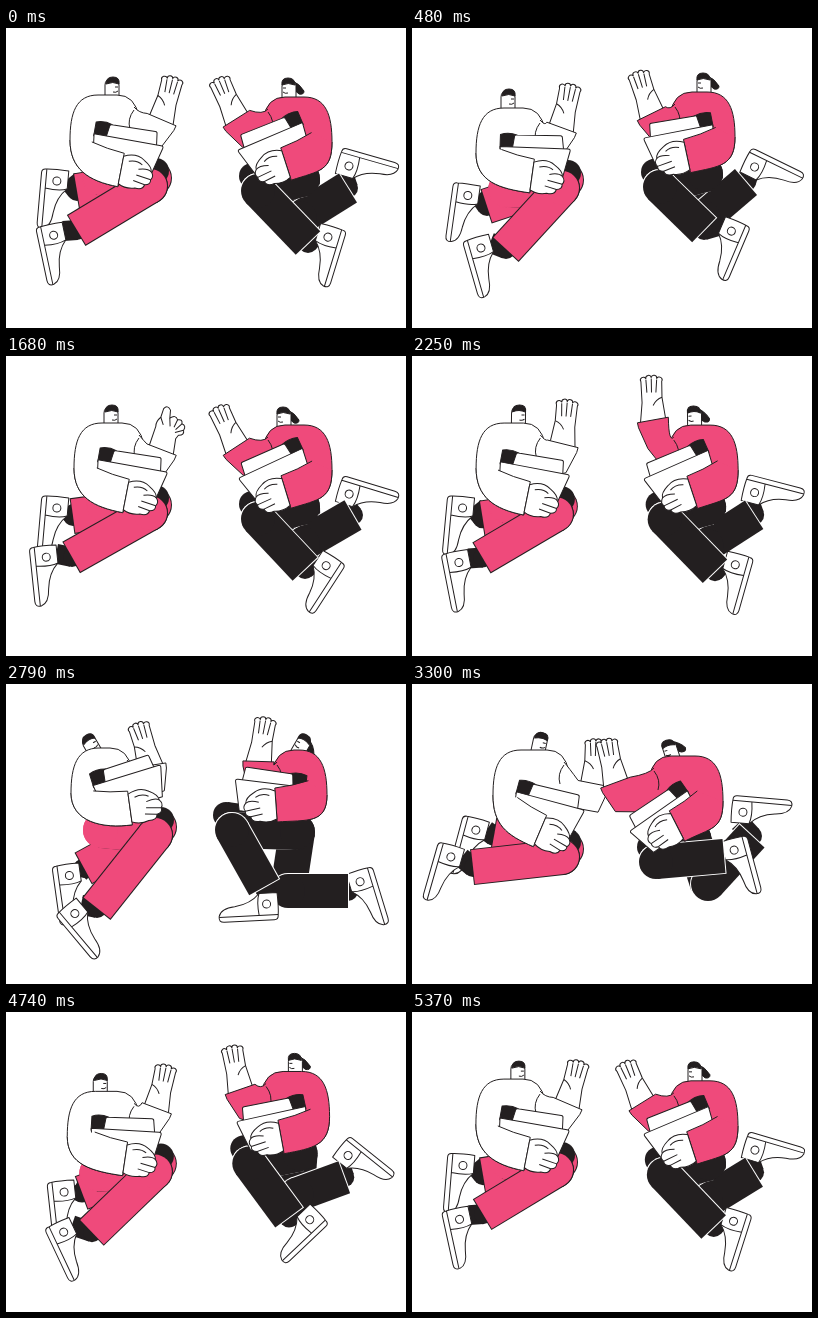
An HTML page with a canvas that plays this animation: 400x300 px, repeating every 5.4 s.

```html
<!DOCTYPE html>
<html>
<head>
<meta charset="utf-8">
<style>
html, body { margin: 0; width: 100%; height: 100%; overflow: hidden; background: #fff; }
canvas { display: block; }
</style>
</head>
<body>
<canvas id="stage" width="400" height="300"></canvas>
<script>
const ctx = document.getElementById('stage').getContext('2d');
const INK = '#231f20', PINK = '#ef4a7b', WHITE = '#fff';
const LOOP = 5400, STEP = 30;

// Pose schedule: times in ms and the pose reached at each.
// 0 glide, 1 falling, 2 low, 3 rising, 4 crouch, 5 high five, 6 reach
const times = [0, 480, 990, 1680, 2280, 2790, 3300, 3500, 4080, 4570];
const order = [0, 1, 2, 3, 6, 4, 5, 5, 1, 2];

// Tracks hold [x, y, angle] per pose; body holds [left, top, right].
// The right figure is described mirrored, so both share one drawing routine.
const left = { shirt: WHITE, pants: PINK, edge: INK };
left.head = [[106, 68, 0], [96, 80, 0], [92, 83, 0], [105, 68, 0], [89, 68, -30], [126, 67, 12]];
left.body = [[64, 67, 133], [64, 80, 133], [61, 82, 133], [68, 67, 138], [65, 64, 126], [81, 66, 157]];
left.cuff = [[115, 142, 11], [120, 148, 8], [120, 148, 8], [120, 140, 11], [124, 124, -8], [128, 147, 23]];
left.palm = [[155, 92, 14], [149, 100, 11], [149, 98, 11], [155, 94, 12], [144, 82, -18], [181, 100, 2], [150, 88, 4]];
left.book = [[157, 118, 10], [158, 121, 2], [155, 121, 2], [161, 116, 10], [154, 81, -17], [172, 126, 15]];
left.knee = [[144, 158], [150, 160], [150, 160], [144, 157], [149, 151], [150, 173]];
left.hem = [[71, 202], [94, 221], [90, 224], [66, 201], [91, 224], [61, 183]];
left.foot = [[58, 203, 78], [79, 215, 74], [70, 216, 63], [51, 198, 84], [76, 221, 50], [50, 174, 106]];
left.rearHem = [[71, 163], [75, 178], [77, 184], [67, 160], [78, 184], [82, 152]];
left.rearFoot = [[62, 152, 95], [67, 167, 98], [70, 181, 83], [62, 151, 95], [74, 188, 82], [75, 147, 105]];

const right = { shirt: PINK, pants: INK, edge: WHITE, tail: true };
right.head = [[117, 69, 0], [108, 64, 0], [109, 59, 0], [122, 70, 0], [108, 68, -30], [139, 74, 18]];
right.body = [[74, 69, 143], [77, 64, 142], [77, 58, 145], [74, 69, 143], [79, 66, 134], [89, 72, 163]];
right.cuff = [[120, 136, 18], [125, 128, 12], [126, 123, 9], [120, 136, 17], [130, 121, 4], [135, 142, 27]];
right.palm = [[169, 91, 23], [160, 86, 17], [164, 76, 8], [169, 91, 24], [147, 78, -11], [196, 99, 11], [158, 64, 0]];
right.book = [[168, 122, 23], [168, 110, 11], [169, 107, 10], [167, 122, 25], [170, 95, -7], [182, 147, 35]];
right.knee = [[148, 163], [152, 159], [158, 150], [148, 163], [174, 146], [156, 178]];
right.hem = [[98, 215], [108, 202], [120, 203], [101, 213], [142, 203], [88, 172]];
right.foot = [[88, 204, 73], [90, 197, 67], [104, 197, 40], [88, 202, 57], [138, 209, 3], [89, 167, 105]];
right.rearKnee = [[106, 190], [108, 190], [110, 182], [103, 188], [118, 207], [104, 200]];
right.rearHem = [[58, 160], [66, 154], [63, 165], [53, 159], [58, 207], [60, 152]];
right.rearFoot = [[62, 148, 164], [64, 148, 154], [67, 151, 138], [62, 148, 163], [57, 199, 107], [72, 139, 175]];

const art = Object.fromEntries(Object.entries({
  shoe: 'M-9 0Q-10 14-9 23Q-9 27-5 27H45Q51 27 50 21Q48 13 34 12Q18 10 9 0Z',
  shoeLines: 'M-9 22H50M9 0Q12 8 10 22M6 11a4 4 0 1 0-8 0a4 4 0 1 0 8 0',
  open: 'M-13 3L-9-23L-9-39a2.7 2.7 0 0 1 5-3a2.7 2.7 0 0 1 5.4-1a2.7 2.7 0 0 1 5.4 1a2.7 2.7 0 0 1 5 3L11-18L13 3',
  openLines: 'M-4-41L-3-28M1.4-42V-28M6.8-41L6-28M-9-23q6 2 9 8',
  thumb: 'M-13 3L-10-22Q-11-27-7-32L-6-41Q-3-46 1-41L2-33Q7-38 10-33Q15-35 15-30Q20-29 18-24Q20-19 14-18L12-14L13 3',
  thumbLines: 'M2-33L4-25M10-33L8-25M15-30L10-23M18-24L10-20M-7-32L-3-25',
  ring: 'M-13 3L-11-23L-11-40a2.7 2.7 0 0 1 5.4-2a2.7 2.7 0 0 1 5.4-3a2.7 2.7 0 0 1 5.4 1Q10-50 15-47Q23-44 21-35Q20-27 13-24L13 3',
  ringLines: 'M-5.6-42L-4-28M0-45V-28M5-44L4-30M18-38a5 5 0 1 0-10 0a5 5 0 1 0 10 0M7-31Q12-26 18-29',
  grip: 'M0-14Q12-20 21-14Q30-9 30-4Q34 0 31 4Q32 9 26 10Q25 16 17 15Q8 18 0 14Z',
  gripLines: 'M17-4Q26-7 30-4M16 2L31 4M14 8L26 10M6-10Q14-13 20-9',
  neck: 'M-7 3V-11Q-7-17 0-17Q7-17 7-11V3',
  face: 'M3-9h3M1-4q3 1 5-1',
  hair: 'M-6-12Q-6-19 1-19Q8-19 7-12Q1-15-6-12Z',
  tail: 'M-3-16Q-10-14-15-6Q-15-2-10-3Q-5-6-3-12Z',
  blackBook: 'M-70-12Q-62-15-53-12L-52 2H-70Z',
  rearBook: 'M-56-10Q-56-12-54-12L-10-13Q-8-13-8-11L-6 4H-58Z',
  frontBook: 'M-70 0H-2Q1 0 0 3L-7 31H-66Z'
}).map(([name, d]) => [name, new Path2D(d)]));

function sampler(time) {
  const n = times.length;
  let i = n - 1;
  while (times[i] > time) i--;
  const when = k => times[(k + n) % n] + Math.floor(k / n) * LOOP;
  const [t0, t1, t2, t3] = [-1, 0, 1, 2].map(k => when(i + k));
  const span = t2 - t1, u = (time - t1) / span;
  return track => {
    const [a, b, c, d] = [-1, 0, 1, 2].map(k => track[order[(i + k + n) % n]] || track[0]);
    return b.map((p, k) => {
      const q = c[k];
      const m = (q - a[k]) / (t2 - t0) * span, w = (d[k] - p) / (t3 - t1) * span;
      return p + u * (m + u * (3 * (q - p) - 2 * m - w + u * (2 * (p - q) + m + w)));
    });
  };
}

function paint(path, fill, line = INK) {
  if (fill) { ctx.fillStyle = fill; ctx.fill(path); }
  if (line) { ctx.strokeStyle = line; ctx.stroke(path); }
}

function place([x, y, angle = 0], draw) {
  ctx.save();
  ctx.translate(x, y);
  ctx.rotate(angle * Math.PI / 180);
  draw();
  ctx.restore();
}

// Point of a rotated part in figure coordinates
function spot([x, y, angle], px, py) {
  const r = angle * Math.PI / 180, c = Math.cos(r), s = Math.sin(r);
  return [x + px * c - py * s, y + px * s + py * c];
}

function limb([ax, ay], [bx, by], width, fill, edge) {
  const len = Math.hypot(bx - ax, by - ay) || 1;
  const ux = (bx - ax) / len, uy = (by - ay) / len;
  for (const [grow, color] of [[1, edge], [0, fill]]) {
    ctx.strokeStyle = ctx.fillStyle = color;
    ctx.lineWidth = width + grow * 2;
    ctx.beginPath();
    ctx.moveTo(ax, ay);
    ctx.lineTo(bx + ux * grow, by + uy * grow);
    ctx.stroke();
    ctx.beginPath();
    ctx.arc(ax, ay, width / 2 + grow, 0, 7);
    ctx.fill();
  }
  ctx.lineWidth = 1;
}

function foot(hem, ankle) {
  limb(hem, ankle, 18, INK, INK);
  place(ankle, () => { paint(art.shoe, WHITE); paint(art.shoeLines); });
}

function person(who, get, gesture) {
  const [x, top, edgeX] = get(who.body);
  const cuff = get(who.cuff), palm = get(who.palm), knee = get(who.knee);
  const hem = get(who.hem), rearHem = get(who.rearHem);
  const rearKnee = who.rearKnee ? get(who.rearKnee) : [knee[0] + 4, knee[1] - 8];
  const hip = [x + 30, top + 82];
  const leg = (a, b) => limb(a, b, 34, who.pants, who.edge);

  foot(rearHem, get(who.rearFoot));
  limb(hip, rearKnee, 34, who.pants, who.pants);
  leg(rearKnee, rearHem);
  foot(hem, get(who.foot));
  limb([knee[0] + 6, knee[1] - 15], [x + 50, top + 72], 24, INK, INK);
  limb(knee, hip, 34, who.pants, who.edge);
  limb(hip, knee, 34, who.pants, who.pants);
  leg(knee, hem);

  place(get(who.head), () => {
    if (who.tail) paint(art.tail, INK);
    paint(art.neck, WHITE);
    paint(art.face);
    paint(art.hair, INK);
  });

  const cuffTop = spot(cuff, 0, -17), cuffEnd = spot(cuff, 0, 17);
  const bend = spot(cuff, -30, 17);
  const elbow = `C${x} ${top + 74} ${bend} ${cuffEnd}`;
  paint(new Path2D(`M${cuffEnd}L${edgeX - 4} ${top + 58}L${edgeX} ${top + 22}Q${edgeX - 4} ${top} ${edgeX - 22} ${top}
    H${x + 28}C${x + 6} ${top} ${x} ${top + 18} ${x} ${top + 45}${elbow}`), who.shirt);

  place(palm, () => { paint(art[gesture], WHITE); paint(art[gesture + 'Lines']); });
  paint(new Path2D(`M${edgeX - 5} ${top + 12}Q${edgeX} ${top + 18} ${spot(palm, -15, -3)}L${spot(palm, 16, 2)}
    L${spot(palm, 15, 7)}L${spot(palm, 6, 28)}L${edgeX - 5} ${top + 56}`), who.shirt);
  paint(new Path2D(`M${edgeX - 5} ${top + 15}Q${edgeX - 12} ${top + 24} ${edgeX - 9} ${top + 34}`));

  place(get(who.book), () => {
    paint(art.blackBook, INK);
    paint(art.rearBook, WHITE);
    paint(art.frontBook, WHITE);
  });

  const crease = spot(cuff, -34, -22);
  const upper = `M${cuffTop}Q${spot(cuff, -18, -18)} ${crease}`;
  paint(new Path2D(`${upper}L${x} ${top + 45}${elbow}Z`), who.shirt, null);
  paint(new Path2D(`${upper}M${x} ${top + 45}${elbow}L${cuffTop}`));
  place(cuff, () => { paint(art.grip, WHITE); paint(art.gripLines); });
}

function frame(now) {
  const time = Math.floor(now % LOOP / STEP) * STEP;
  const get = sampler(time);
  ctx.fillStyle = WHITE;
  ctx.fillRect(0, 0, 400, 300);
  ctx.lineWidth = 1;
  ctx.lineJoin = 'round';
  person(left, get, time > 660 && time < 2000 ? 'thumb' : 'open');
  ctx.save();
  ctx.translate(400, 0);
  ctx.scale(-1, 1);
  person(right, get, time > 660 && time < 1380 ? 'ring' : 'open');
  ctx.restore();
}

const start = performance.now();
function tick() {
  frame(performance.now() - start);
  requestAnimationFrame(tick);
}
tick();
</script>
</body>
</html>
```
